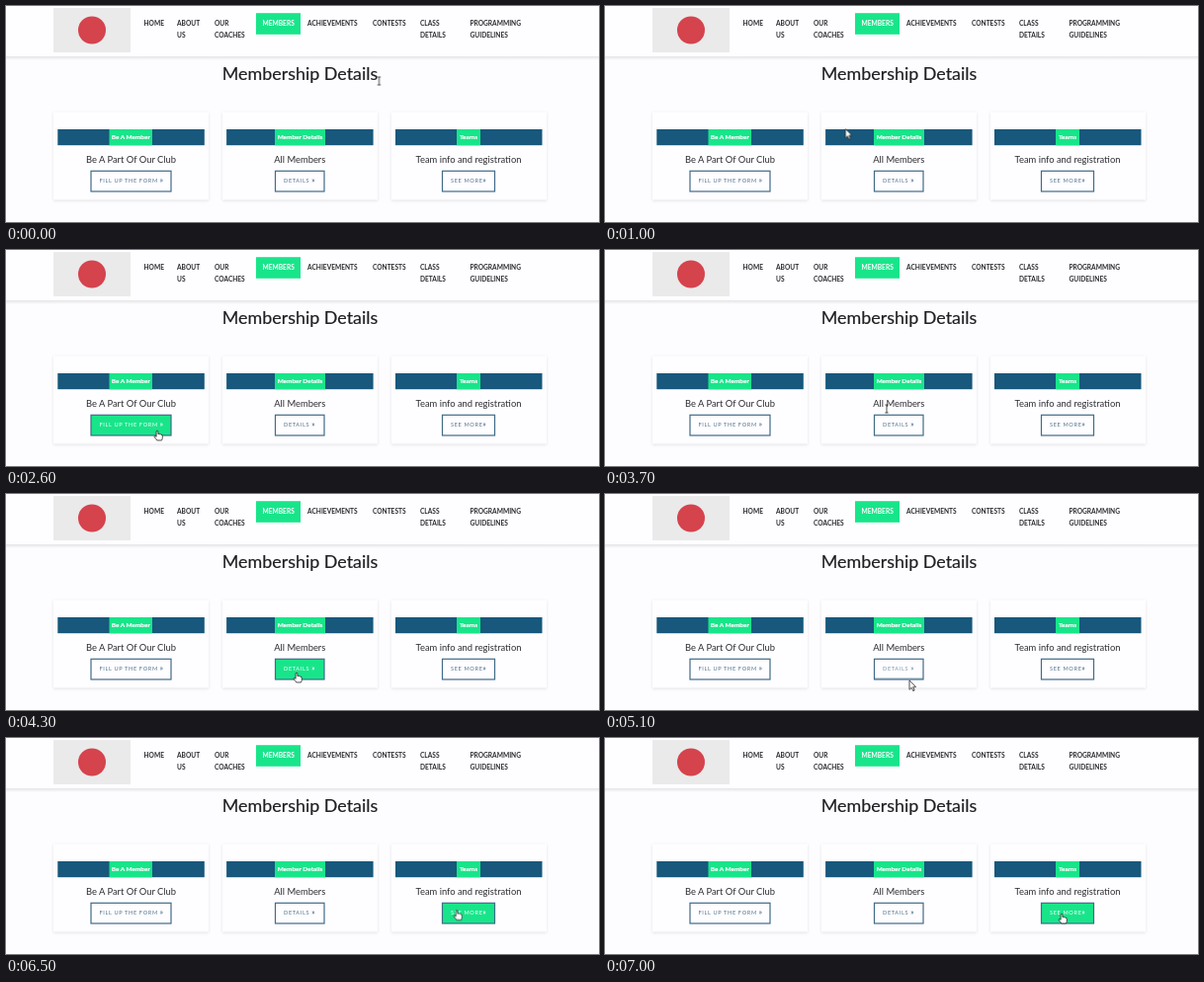
An HTML page that plays this animation: 600 by 219 pixels, repeating every 7100 ms.

```html
<!DOCTYPE html>
<html lang="en">
<head>
<meta charset="utf-8">
<title>Membership Details</title>
<style>
  @property --h { syntax: "<number>"; inherits: true; initial-value: 0; }

  html, body { margin: 0; width: 100%; height: 100%; overflow: hidden; background: #fdfcfe; }
  svg { display: block; width: 600px; height: 219px; font-family: Lato, "Open Sans", sans-serif; }

  .nav { font-size: 6.6px; font-weight: 700; fill: #2b2b2e; }
  .title { font-size: 17.9px; fill: #1f1f22; stroke: #1f1f22; stroke-width: .2; text-anchor: middle; }
  .name { font-size: 9.4px; fill: #2c2c30; text-anchor: middle; }
  .tag { font-size: 6.45px; font-weight: 700; fill: #fff; stroke: #fff; stroke-width: .2; text-anchor: middle; }
  .card { fill: #fefdff; filter: drop-shadow(0 1px 1.5px rgba(0, 0, 0, .11)); }
  .bar { fill: #17587c; }
  .green { fill: #18e58a; }

  /* --h is the hover progress of a button, 0 to 1 */
  .btn { animation: 7.1s linear infinite; }
  .btn .box { fill: #fefdff; }
  .btn .edge { fill: none; stroke: #3f6b87; stroke-width: 1.2; }
  .btn .fill {
    transform-box: fill-box;
    transform-origin: 50% 100%;
    transform: scaleY(var(--h));
    fill: color-mix(in srgb, #18e58a clamp(0%, (var(--h) - .22) * 160%, 100%), #c3d2dc);
  }
  .btn text {
    font-size: 5.6px;
    letter-spacing: .65px;
    fill: color-mix(in srgb, #fff clamp(0%, var(--h) * 300%, 100%), #52758c);
  }
  .btn tspan { font-size: 7px; font-weight: 700; }

  #b1 { animation-name: hover1; }
  #b2 { animation-name: hover2; }
  #b3 { animation-name: hover3; }
  @keyframes hover1 { 0%, 24.4% { --h: 0 } 28.4%, 42.3% { --h: 1 } 45.1%, 100% { --h: 0 } }
  @keyframes hover2 { 0%, 55.8% { --h: 0 } 59.6%, 69.3% { --h: 1 } 72.1%, 100% { --h: 0 } }
  @keyframes hover3 { 0%, 85.9% { --h: 0 } 89.9%, 100% { --h: 1 } }

  #cursor { animation: path 7.1s ease-in-out infinite; }
  @keyframes path {
    0%, 4.2% { transform: translate(377.5px, 76px) }
    24% { transform: translate(109px, 173px) }
    25.35%, 28.2% { transform: translate(106px, 177px) }
    36.6% { transform: translate(153px, 183px) }
    40.8% { transform: translate(156px, 185px) }
    52.1% { transform: translate(285px, 161px) }
    56.3% { transform: translate(291px, 169px) }
    60.6%, 66.2% { transform: translate(294px, 181px) }
    70.4% { transform: translate(302px, 189px); animation-timing-function: ease-in }
    77.5% { transform: translate(395px, 187px); animation-timing-function: linear }
    83.8% { transform: translate(439px, 176px); animation-timing-function: ease-out }
    85.9% { transform: translate(452px, 172px) }
    98.6%, 100% { transform: translate(462px, 178px) }
  }

  .pointer {
    visibility: hidden;
    fill: #fff;
    stroke: #222;
    stroke-width: .8;
    stroke-linejoin: round;
    animation: 7.1s step-end infinite;
  }
  #beam { animation-name: beam; }
  #arrow { animation-name: arrow; }
  #hand { animation-name: hand; }
  @keyframes beam {
    0%, 18.6%, 50% { visibility: visible }
    9.4%, 20.8%, 55.4%, 100% { visibility: hidden }
  }
  @keyframes arrow {
    0%, 18.6%, 22%, 50%, 84.2%, 100% { visibility: hidden }
    9.4%, 20.8%, 42.3%, 69.3% { visibility: visible }
  }
  @keyframes hand {
    0%, 42.3%, 69.3% { visibility: hidden }
    22%, 55.4%, 84.2%, 100% { visibility: visible }
  }
</style>
</head>
<body>
<svg viewBox="0 0 600 219">
  <defs>
    <linearGradient id="shade" x2="0" y2="1">
      <stop offset="0" stop-color="#e4e4e6"/>
      <stop offset="1" stop-color="#fdfcfe"/>
    </linearGradient>
  </defs>

  <rect width="600" height="219" fill="#fdfcfe"/>
  <rect width="600" height="51" fill="#fefdff"/>
  <rect y="51" width="600" height="4" fill="url(#shade)"/>
  <rect x="48" y="2" width="78" height="45" fill="#eaeaeb"/>
  <circle cx="87" cy="24.5" r="14" fill="#d5434d"/>

  <rect class="green" x="253" y="7.2" width="45" height="21.6"/>
  <g class="nav">
    <text x="139.5" y="19.6">HOME</text>
    <text x="173" y="19.6">ABOUT<tspan x="173" y="32.4">US</tspan></text>
    <text x="211" y="19.6">OUR<tspan x="211" y="32.4">COACHES</tspan></text>
    <text x="259.5" y="19.6" fill="#fff">MEMBERS</text>
    <text x="305" y="19.6">ACHIEVEMENTS</text>
    <text x="371" y="19.6">CONTESTS</text>
    <text x="419" y="19.6">CLASS<tspan x="419" y="32.4">DETAILS</tspan></text>
    <text x="469.5" y="19.6">PROGRAMMING<tspan x="469.5" y="32.4">GUIDELINES</tspan></text>
  </g>

  <text class="title" x="297.5" y="75">Membership Details</text>

  <g>
    <rect class="card" x="48" y="107.5" width="157" height="89"/>
    <rect class="bar" x="52.3" y="125" width="148.5" height="16.2"/>
    <rect class="green" x="104.5" y="125" width="43.5" height="16.2"/>
    <text class="tag" x="126.3" y="135.4">Be A Member</text>
    <text class="name" x="126.5" y="159.2">Be A Part Of Our Club</text>
    <g class="btn" id="b1">
      <rect class="box" x="86" y="167.3" width="81" height="20.7"/>
      <rect class="fill" x="86" y="167.3" width="81" height="20.7"/>
      <rect class="edge" x="86" y="167.3" width="81" height="20.7"/>
      <text x="94.5" y="179.4">FILL UP THE FORM <tspan>»</tspan></text>
    </g>
  </g>

  <g>
    <rect class="card" x="219" y="107.5" width="157" height="89"/>
    <rect class="bar" x="223.1" y="125" width="148.5" height="16.2"/>
    <rect class="green" x="272" y="125" width="51" height="16.2"/>
    <text class="tag" x="297.5" y="135.4">Member Details</text>
    <text class="name" x="297.3" y="159.2">All Members</text>
    <g class="btn" id="b2">
      <rect class="box" x="272.5" y="167.3" width="49.5" height="20.7"/>
      <rect class="fill" x="272.5" y="167.3" width="49.5" height="20.7"/>
      <rect class="edge" x="272.5" y="167.3" width="49.5" height="20.7"/>
      <text x="281" y="179.4">DETAILS <tspan>»</tspan></text>
    </g>
  </g>

  <g>
    <rect class="card" x="390" y="107.5" width="157" height="89"/>
    <rect class="bar" x="394" y="125" width="148.5" height="16.2"/>
    <rect class="green" x="456" y="125" width="24" height="16.2"/>
    <text class="tag" x="468" y="135.4">Teams</text>
    <text class="name" x="468" y="159.2">Team info and registration</text>
    <g class="btn" id="b3">
      <rect class="box" x="441.5" y="167.3" width="53" height="20.7"/>
      <rect class="fill" x="441.5" y="167.3" width="53" height="20.7"/>
      <rect class="edge" x="441.5" y="167.3" width="53" height="20.7"/>
      <text x="450" y="179.4">SEE MORE<tspan>»</tspan></text>
    </g>
  </g>

  <g id="cursor">
    <path class="pointer" id="beam" d="M-1.6-4H1.6M0-4V4M-1.6 4H1.6"/>
    <path class="pointer" id="arrow" d="M0 0V9.4L2.2 7.4 3.8 10.8 5.2 10.1 3.7 6.8H6.6Z"/>
    <path class="pointer" id="hand" d="M-.9.7Q0-.5.9.7V3.6Q2.2 2.7 2.5 3.9 3.7 3.2 4 4.4 5.3 4 5.3 5.3V7.2Q5.3 8.7 4.5 10H-.2Q-1.2 8.5-2.8 6.7-3.1 5.2-1.8 5.6L-.9 6.4Z"/>
  </g>
</svg>
</body>
</html>
```
